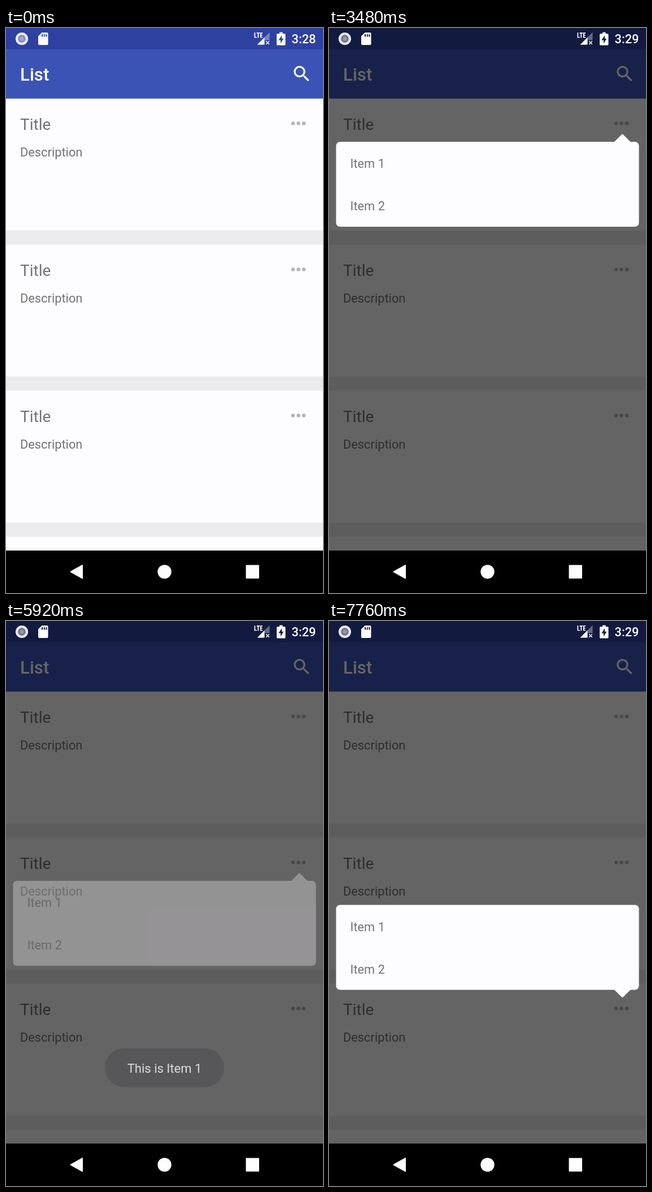
An HTML page that plays this animation: 561 px wide and 998 px high, repeating every 7840 ms.

```html
<!DOCTYPE html>
<html lang="en">
<head>
<meta charset="utf-8">
<title>List with popup menus</title>
<style>
  html, body { margin: 0; width: 100%; height: 100%; overflow: hidden; background: #000; }
  svg { display: block; width: 100%; height: 100%; font-family: Roboto, "Noto Sans", sans-serif; }
  .title { font-size: 28px; fill: #737274; }
  .body { font-size: 21.8px; fill: #737274; }
</style>
</head>
<body>
<svg viewBox="0 0 561 998">
  <rect width="561" height="998" fill="#fdfcfe"/>
  <g id="rows"></g>

  <rect width="561" height="124.7" fill="#3c53b6"/>
  <rect width="561" height="37.5" fill="#2e41a1"/>
  <text x="25" y="93" font-size="31.2" font-weight="500" fill="#fff">List</text>
  <path fill="#fff" transform="translate(504.7 62.3) scale(1.558)"
    d="M15.5 14h-.79l-.28-.27A6.5 6.5 0 1 0 13.73 14.43l.27.28v.79l5 4.99L20.49 19zm-6 0a4.5 4.5 0 1 1 0-9 4.5 4.5 0 0 1 0 9z"/>

  <rect id="dim" width="561" height="923" opacity=".6"/>
  <g id="popups"></g>

  <g id="status" fill="#fff">
    <circle cx="28" cy="19" r="8.9" fill="none" stroke="#fff" stroke-width="4.4" opacity=".9"/>
    <circle cx="28" cy="19" r="6.8" opacity=".4"/>
    <circle cx="28" cy="19" r="3.6" opacity=".25"/>
    <path fill-rule="evenodd" d="M63.5 8H72.5Q74.5 8 74.5 10V28Q74.5 30 72.5 30H59Q57 30 57 28V14.5ZM63 11v4.5h2V11ZM66.700 11v4.500h2V11ZM70.400 11v4.500h2V11Z"/>
    <path fill="none" stroke="#fff" stroke-width="1.7" d="M440.300 8V16.500H444M443.500 8.800H449M446.300 8.800V17.300M454 8.800H450.600V16.500H454M450.600 12.600H453.500"/>
    <path d="M444.500 29.500 457.500 16.500V29.500Z"/>
    <path opacity=".35" d="M457.500 16.500 466.500 7.500V21.500H457.500Z"/>
    <path fill="none" stroke="#fff" stroke-width="1.6" d="M460.300 23.300l5.500 5.500m0-5.500l-5.500 5.500"/>
    <path fill-rule="evenodd" d="M484 7.500H489.500V10H493Q494.500 10 494.500 11.500V29Q494.500 30.500 493 30.500H480.500Q479 30.500 479 29V11.500Q479 10 480.500 10H484ZM488 13 482.300 21.500H486V27.500L491.300 18.800H488Z"/>
    <text id="clock" x="505.5" y="27" font-size="21.8" font-weight="500"></text>
  </g>

  <g id="toast">
    <rect x="175" y="754.7" width="211" height="68.6" rx="34.3" fill="#535355" opacity=".88"/>
    <text x="280.5" y="798" font-size="22" text-anchor="middle" fill="#fff" opacity=".95">This is Item 1</text>
  </g>

  <rect y="923" width="561" height="75"/>
  <g fill="#fdfcfe" stroke="#fdfcfe" stroke-linejoin="round">
    <path d="M114.500 960.500 135 949V972Z" stroke-width="2"/>
    <circle cx="280.500" cy="960.500" r="12.200" stroke="none"/>
    <rect x="425.500" y="949.500" width="21.500" height="22" stroke-width="2"/>
  </g>
</svg>
<script>
  const LOOP = 7840, STEP = 40, ROW = 258, OPEN_DELAY = 80;
  const $ = id => document.getElementById(id);

  // open..shown: fading in; leave..gone: fading out
  const menus = [
    { top: 201, below: true, open: 160, shown: 560, leave: 3480, gone: 3840 },
    { top: 459, below: true, open: 5080, shown: 5520, leave: 5720, gone: 6040 },
    { top: 501.500, below: false, open: 7360, shown: 7760, leave: LOOP, gone: LOOP + 1 }
  ];
  const toastTimes = { open: 3520, shown: 4000, leave: 5720, gone: 6200 };

  const row = y => `
    <g transform="translate(0 ${y})">
      <text class="title" x="25" y="180">Title</text>
      <text class="body" x="25" y="227">Description</text>
      ${[508, 517.5, 527].map(x => `<circle cx="${x}" cy="168.5" r="3.3" fill="#b5b4b7"/>`).join("")}
      <rect y="357.6" width="561" height="25" fill="#ebeaec"/>
    </g>`;

  const popup = ({ top, below }) => `
    <g transform="translate(0 ${top})">
      <rect x="12.500" width="536" height="150" rx="7" fill="#fdfcfe"/>
      <path d="${below ? "M504.500 .5 519.300 -14 534 .5Z" : "M504.500 149.500 519.300 164 534 149.500Z"}" fill="#fdfcfe"/>
      <text class="body" x="37.5" y="46">Item 1</text>
      <text class="body" x="37.5" y="121">Item 2</text>
    </g>`;

  $("rows").innerHTML = [0, 1, 2].map(i => row(i * ROW)).join("");
  $("popups").innerHTML = menus.map(popup).join("");
  const popupNodes = [...$("popups").children];

  const progress = (t, from, to) => Math.min(1, Math.max(0, (t - from) / (to - from)));
  const easeInOut = p => (1 - Math.cos(Math.PI * p)) / 2;
  const easeOut = p => 1 - (1 - p) ** 2;

  function render(time) {
    const t = Math.floor((time % LOOP) / STEP) * STEP;
    menus.forEach((m, i) => {
      const fadeIn = easeInOut(progress(t, m.open + OPEN_DELAY, m.shown));
      const fadeOut = easeInOut(progress(t, m.leave, m.gone));
      popupNodes[i].setAttribute("opacity", fadeIn * (1 - fadeOut));
    });
    const dimmed = menus.some(m => t >= m.open && t < m.gone);
    $("dim").setAttribute("visibility", dimmed ? "visible" : "hidden");

    const { open, shown, leave, gone } = toastTimes;
    $("toast").setAttribute("opacity",
      easeOut(progress(t, open, shown)) * (1 - progress(t, leave, gone) ** 2));
    $("clock").textContent = t < 2080 ? "3:28" : "3:29";
  }

  const start = performance.now();
  function tick() {
    render(performance.now() - start);
    requestAnimationFrame(tick);
  }
  tick();
</script>
</body>
</html>
```
